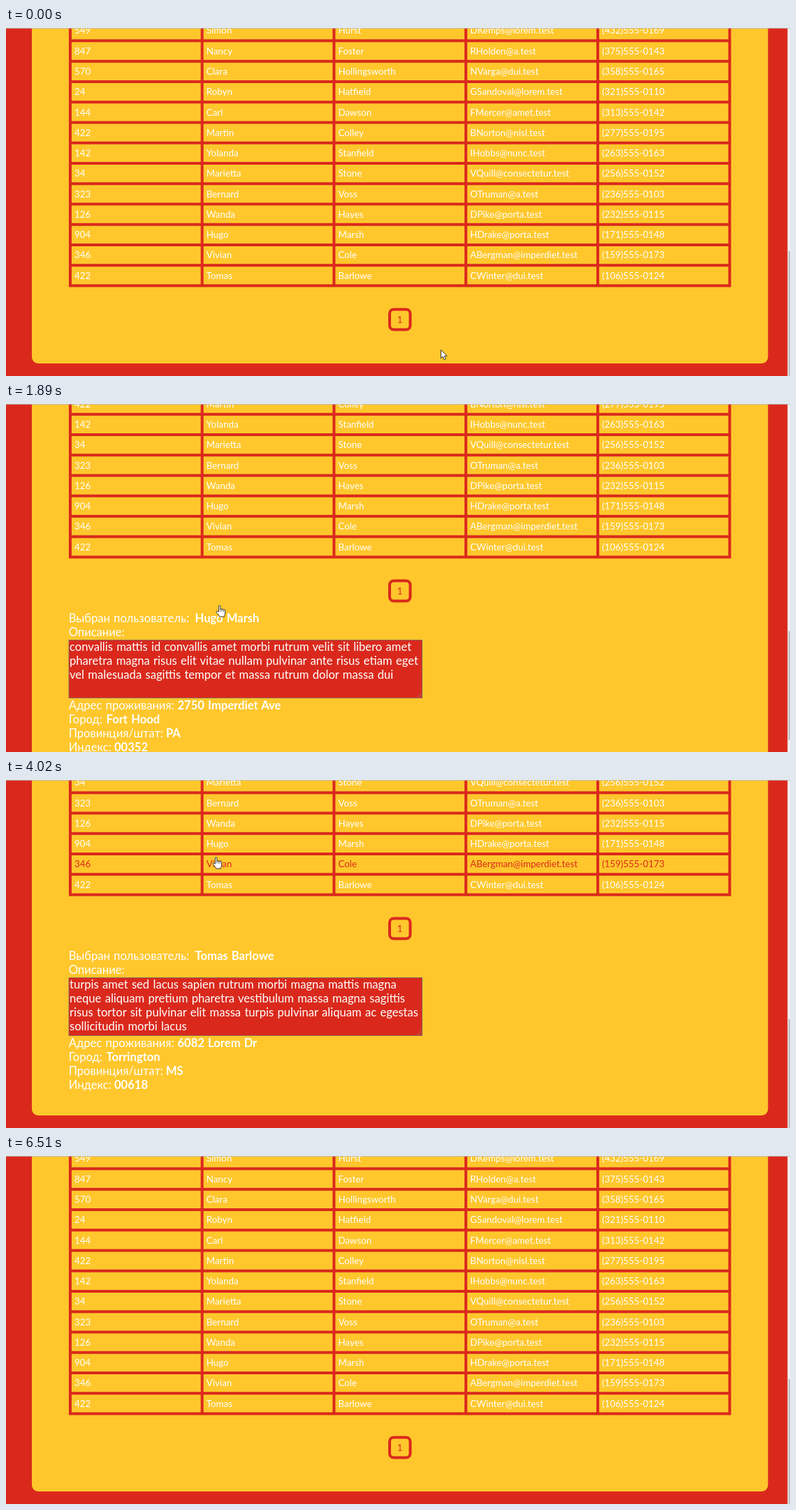
An HTML page for the animation above (7.03 s loop, 1122 px wide and 499 px high).

```html
<!DOCTYPE html>
<html lang="ru">
<head>
<meta charset="utf-8">
<title>Таблица пользователей</title>
<style>
html, body { margin: 0; width: 100%; height: 100%; overflow: hidden; background: #da291c; }
svg { display: block; width: 1122px; height: 499px; font-family: Lato, "Open Sans", sans-serif; }
text { white-space: pre; }
.cells { font-size: 13.35px; }
.info { font-size: 16.6px; word-spacing: .065em; fill: #fff; }
.info .val { font-weight: 700; }
</style>
</head>
<body>
<svg id="stage" viewBox="0 0 1122 499"></svg>
<script>
const RED = '#da291c', YELLOW = '#ffc72c';
const LOOP = 7030, VIEW = 499, EXTRA = 205, PAGE = 1390;
const ROW_H = 29.27, COL_W = 188.75, LAST_ROW = 355, TABLE_END = 369.6;

const rows = [
  '549|Simon|Hurst|DKemps@lorem.test|(432)555-0169',
  '847|Nancy|Foster|RHolden@a.test|(375)555-0143',
  '570|Clara|Hollingsworth|NVarga@dui.test|(358)555-0165',
  '24|Robyn|Hatfield|GSandoval@lorem.test|(321)555-0110',
  '144|Carl|Dawson|FMercer@amet.test|(313)555-0142',
  '422|Martin|Colley|BNorton@nisl.test|(277)555-0195',
  '142|Yolanda|Stanfield|IHobbs@nunc.test|(263)555-0163',
  '34|Marietta|Stone|VQuill@consectetur.test|(256)555-0152',
  '323|Bernard|Voss|OTruman@a.test|(236)555-0103',
  '126|Wanda|Hayes|DPike@porta.test|(232)555-0115',
  '904|Hugo|Marsh|HDrake@porta.test|(171)555-0148',
  '346|Vivian|Cole|ABergman@imperdiet.test|(159)555-0173',
  '422|Tomas|Barlowe|CWinter@dui.test|(106)555-0124'
].map(r => r.split('|'));

const users = [
  { values: ['Hugo Marsh', '', '2750 Imperdiet Ave', 'Fort Hood', 'PA', '00352'],
    about: ['convallis mattis id convallis amet morbi rutrum velit sit libero amet',
      'pharetra magna risus elit vitae nullam pulvinar ante risus etiam eget',
      'vel malesuada sagittis tempor et massa rutrum dolor massa dui'] },
  { values: ['Tomas Barlowe', '', '6082 Lorem Dr', 'Torrington', 'MS', '00618'],
    about: ['turpis amet sed lacus sapien rutrum morbi magna mattis magna',
      'neque aliquam pretium pharetra vestibulum massa magna sagittis',
      'risus tortor sit pulvinar elit massa turpis pulvinar aliquam ac egestas',
      'sollicitudin morbi lacus'] },
  { values: ['Vivian Cole', '', '3917 Porta St', 'Springdale', 'OH', '00274'],
    about: ['sed lacus tempor magna elit amet sagittis vitae rutrum morbi ante',
      'pulvinar dolor massa eget risus aliquam velit sit libero convallis',
      'mattis etiam turpis neque pharetra sapien dui vel tortor'] }
];

// label, baseline, left edge of the value
const fields = [
  ['Выбран пользователь:', 258, 270.5],
  ['Описание:', 278.4, 175],
  ['Адрес проживания:', 382.5, 245.5],
  ['Город:', 402.7, 143.5],
  ['Провинция/штат:', 422.9, 226],
  ['Индекс:', 443, 155]
];

// Every track holds its value until the next time
const pointer = [
  [0, 'arrow', 622, 461], [130, 'arrow', 622, 461], [270, 'arrow', 600, 455],
  [400, 'arrow', 480, 430], [520, 'arrow', 361, 400], [660, 'hand', 312, 352],
  [800, 'hand', 300, 315], [920, 'hand', 296, 286], [1060, 'hand', 297, 285],
  [1330, 'hand', 299, 287], [1470, 'hand', 300, 288], [2020, 'beam', 306, 289],
  [2710, 'arrow', 305, 260], [2840, 'arrow', 304, 225], [2960, 'arrow', 302, 190],
  [3090, 'hand', 297, 153], [3210, 'hand', 296, 149], [3340, 'hand', 295, 147],
  [3890, 'hand', 295, 122], [4020, 'hand', 295, 110], [4450, 'arrow', 460, 180],
  [4570, 'arrow', 657, 231], [4710, 'arrow', 743, 268], [4840, 'arrow', 794, 289],
  [5100, 'hand', 791, 289], [5730, 'hand', 800, 294], [5860, 'hand', 824, 310],
  [5980, 'hand', 855, 330], [6120, 'arrow', 1050, 453], [6240, 'arrow', 903, 400],
  [6510, 'none', 0, 0]
];
const hover = [[0, -1], [660, 12], [800, 11], [920, 10], [1890, -1], [3090, 12],
  [3890, 11], [4450, -1], [5100, 10], [6120, -1]];
const scroll = [[0, 0], [1740, 19.5], [1890, 150], [2020, EXTRA], [5100, 0]];
const chosen = [[0, -1], [1740, 0], [3620, 1], [4310, 2], [5100, -1]];

const stage = document.getElementById('stage');

function el(parent, tag, attrs = {}, text) {
  const node = document.createElementNS('http://www.w3.org/2000/svg', tag);
  for (const key in attrs) node.setAttribute(key, attrs[key]);
  if (text !== undefined) node.textContent = text;
  return parent.appendChild(node);
}

function at(track, t) {
  let found = track[0];
  for (const key of track) if (key[0] <= t) found = key;
  return found;
}

el(stage, 'rect', { width: 1122, height: VIEW, fill: RED });
const page = el(stage, 'g');
const panel = el(page, 'rect', { x: 37, y: -400, width: 1053.5, rx: 9, fill: YELLOW });

let grid = '';
for (let i = 0; i <= rows.length; i++) grid += `M89.9 ${TABLE_END - i * ROW_H}H1037.7`;
for (let i = 0; i <= 5; i++) grid += `M${91.9 + i * COL_W} -40V${TABLE_END}`;
el(page, 'path', { d: grid, stroke: RED, 'stroke-width': 4, fill: 'none' });

const lines = rows.map((cells, i) => {
  const g = el(page, 'g', { class: 'cells' });
  const y = LAST_ROW + 4.7 - (rows.length - 1 - i) * ROW_H;
  cells.forEach((cell, c) => el(g, 'text', { x: 98 + c * COL_W, y }, cell));
  return g;
});

el(page, 'rect', { x: 549, y: 403.5, width: 29.5, height: 29, rx: 6,
  fill: 'none', stroke: RED, 'stroke-width': 4 });
el(page, 'text', { x: 563.7, y: 422.5, fill: RED, class: 'cells', 'text-anchor': 'middle' }, '1');

function buildInfo(user) {
  const g = el(page, 'g', { class: 'info', transform: `translate(0 ${EXTRA})` });
  el(g, 'rect', { x: 90, y: 283.5, width: 505.5, height: 83, fill: RED, stroke: '#8a6a5c' });
  user.about.forEach((line, i) => el(g, 'text', { x: 91, y: 298.9 + i * 20.1 }, line));
  el(g, 'path', { d: 'M588.5 365.5l6-6M592 365.5l2.5-2.5', stroke: '#a08078', 'stroke-width': .8 });
  fields.forEach(([label, y, x], i) => {
    const name = el(g, 'text', { x: 89.7, y }, label);
    const left = Math.max(x, 93.7 + name.getComputedTextLength());
    el(g, 'text', { x: left, y, class: 'val' }, user.values[i]);
  });
  return g;
}
const infos = users.map(buildInfo);

el(stage, 'rect', { x: 1118.5, width: 3.5, height: VIEW, fill: '#f1f1f1' });
const thumb = el(stage, 'rect', { x: 1119.8, width: 2.2, fill: '#c1c1c1' });
el(stage, 'rect', { width: 1122, height: 1, fill: '#bbb', opacity: .8 });

const outline = { fill: '#fff', stroke: '#222', 'stroke-width': .9, 'stroke-linejoin': 'round' };
const shapes = {
  arrow: el(stage, 'path', { ...outline, d: 'M.5 .6V12.6L3.3 10 5.2 14.5 7.2 13.6 5.3 9.3H9.2Z' }),
  hand: el(stage, 'g'),
  beam: el(stage, 'path', { d: 'M-2-7.5H2M0-7.5V7.5M-2 7.5H2', fill: 'none',
    stroke: '#8f5148', 'stroke-width': .9 })
};
el(shapes.hand, 'path', { ...outline, d: 'M4.4 10V2a1.2 1.2 0 0 1 2.4 0V6.6a1.1 1.1 0 0 1 2.3 .4' +
  'a1.1 1.1 0 0 1 2.2 .5a1.1 1.1 0 0 1 2.2 .7V12c0 2-1 2.8-1.2 5H5.7C5.1 14.8 3 13.2 1.2 10.8' +
  'C.4 9.5 2 8.5 3 9.2Z' });
el(shapes.hand, 'path', { d: 'M6.8 6.8V9.6M9.1 7.2V9.8M11.3 7.8V10', stroke: '#222', 'stroke-width': .7 });

function draw(t) {
  const top = at(scroll, t)[1], user = at(chosen, t)[1], active = at(hover, t)[1];
  const extra = user < 0 ? 0 : EXTRA, total = PAGE + extra;

  page.setAttribute('transform', `translate(0 ${-top})`);
  panel.setAttribute('height', 881 + extra);
  lines.forEach((g, i) => g.setAttribute('fill', i === active ? RED : '#fff'));
  infos.forEach((g, i) => g.setAttribute('display', i === user ? 'inline' : 'none'));
  thumb.setAttribute('y', (PAGE - VIEW + top) * VIEW / total);
  thumb.setAttribute('height', VIEW * VIEW / total);

  const [, kind, x, y] = at(pointer, t);
  for (const name in shapes) {
    shapes[name].setAttribute('display', name === kind ? 'inline' : 'none');
    shapes[name].setAttribute('transform', `translate(${x} ${y})`);
  }
  shapes.arrow.setAttribute('opacity', t >= 6380 ? .4 : 1);
}

const start = performance.now();
function tick() {
  draw((performance.now() - start) % LOOP);
  requestAnimationFrame(tick);
}
tick();
</script>
</body>
</html>
```
